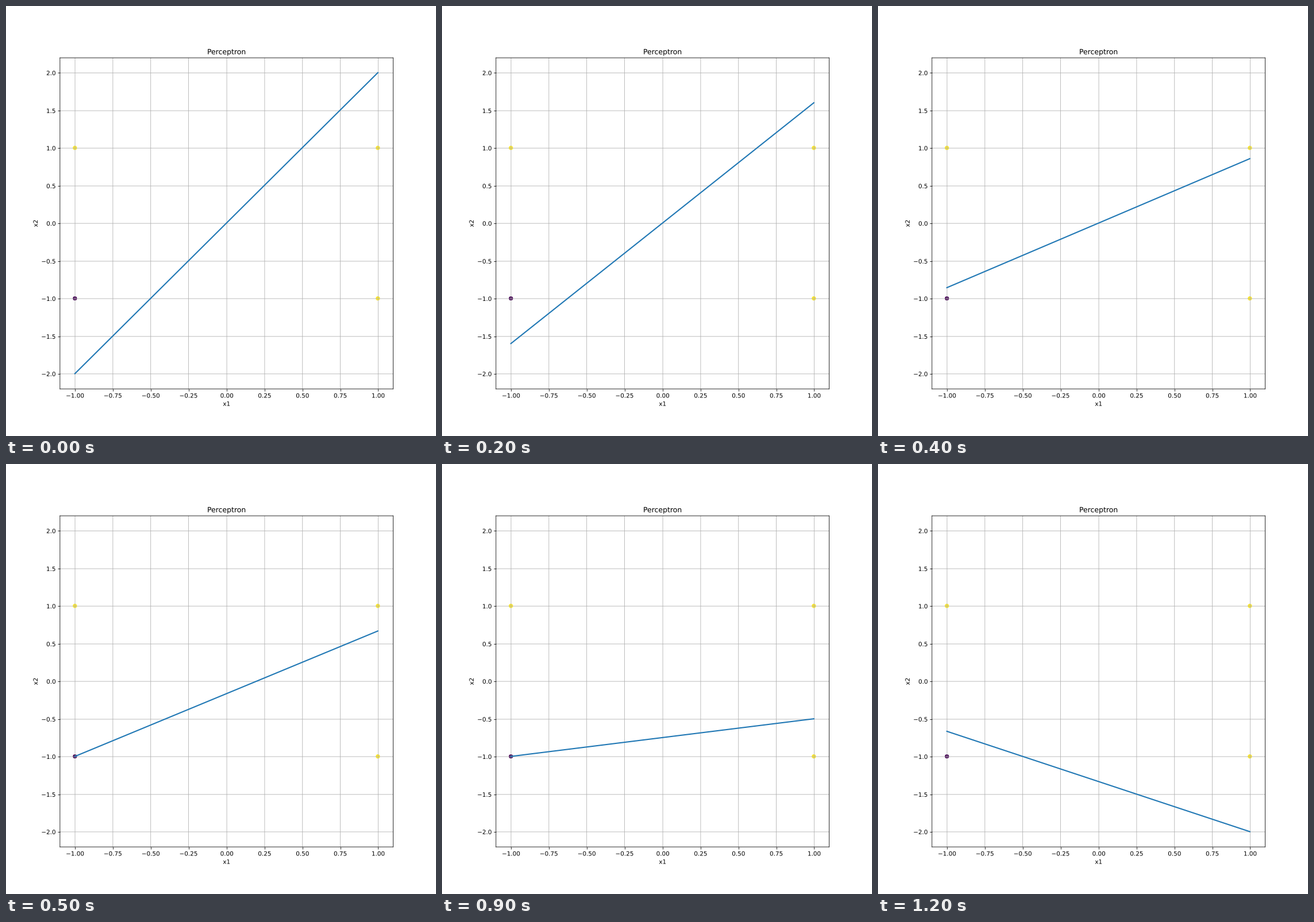
A matplotlib script for the animation above (1.3 s loop, 748 by 748 pixels).

```python
import matplotlib.pyplot as plt
import numpy as np
from matplotlib.animation import FuncAnimation
from matplotlib.patheffects import Normal

SIZE, INCHES = 748, 10
STEP_MS = 100
RATE = 1

# Axes edges on a virtual canvas; grid and frame sit on its pixel centres.
CANVAS = 1000
LEFT, RIGHT, TOP, BOTTOM = 125, 900, 120, 890
X_LIM, Y_LIM = (-1.1, 1.1), (2.2, -2.2)

points = np.array([(-1, -1), (1, -1), (-1, 1), (1, 1)])
labels = np.array([-1, 1, 1, 1])


def train(weights):
    """Return the weights (w1, w2, bias) before and after every correction."""
    w = np.array(weights)
    history = [w]
    clean = False
    while not clean:
        clean = True
        for point, label in zip(points, labels):
            x = np.append(point, 1)
            if label * (w @ x) <= 0:
                w = w + RATE * label * x
                history.append(w)
                clean = False
    return history


def boundary(w, x):
    return -(w[0] * x + w[2]) / w[1]


def on_pixel(values, lim, edges):
    """Move data values to the nearest pixel centre of the virtual canvas."""
    scale = (edges[1] - edges[0]) / (lim[1] - lim[0])
    pixels = edges[0] + (np.asarray(values) - lim[0]) * scale
    return lim[0] + (np.floor(pixels + 0.5) + 0.5 - edges[0]) / scale


def set_axis(axis, values, digits, lim, edges):
    names = [f"{v:.{digits}f}".replace("-", "\u2212") for v in values]
    axis.set_ticks(on_pixel(values, lim, edges), labels=names)
    return sorted(on_pixel(lim, lim, edges))


history = train((-10, 5, 0))
xs = np.array([-1.0, 1.0])

# Unsnapped lines and outline text allow positions between pixels.
plt.rcParams.update({"font.family": "DejaVu Sans", "path.snap": False,
                     "path.effects": [Normal()]})
fig = plt.figure(figsize=(INCHES, INCHES), dpi=SIZE / INCHES)
ax = fig.add_axes(((LEFT + 0.5) / CANVAS, 1 - (BOTTOM + 0.5) / CANVAS,
                   (RIGHT - LEFT) / CANVAS, (BOTTOM - TOP) / CANVAS))
ax.set(title="Perceptron", xlabel="x1", ylabel="x2")
ax.grid(True)
ax.scatter(points[:, 0], points[:, 1], c=labels)
line, = ax.plot(xs, boundary(history[0], xs), color="C0", linewidth=2)

ax.set_xlim(set_axis(ax.xaxis, np.linspace(-1, 1, 9), 2, X_LIM, (LEFT, RIGHT)))
ax.set_ylim(set_axis(ax.yaxis, np.linspace(-2, 2, 9), 1, Y_LIM, (TOP, BOTTOM)))


def update(i):
    line.set_ydata(boundary(history[i], xs))
    return line,


anim = FuncAnimation(fig, update, frames=len(history), interval=STEP_MS,
                     repeat=True, repeat_delay=0)
plt.show()
```
